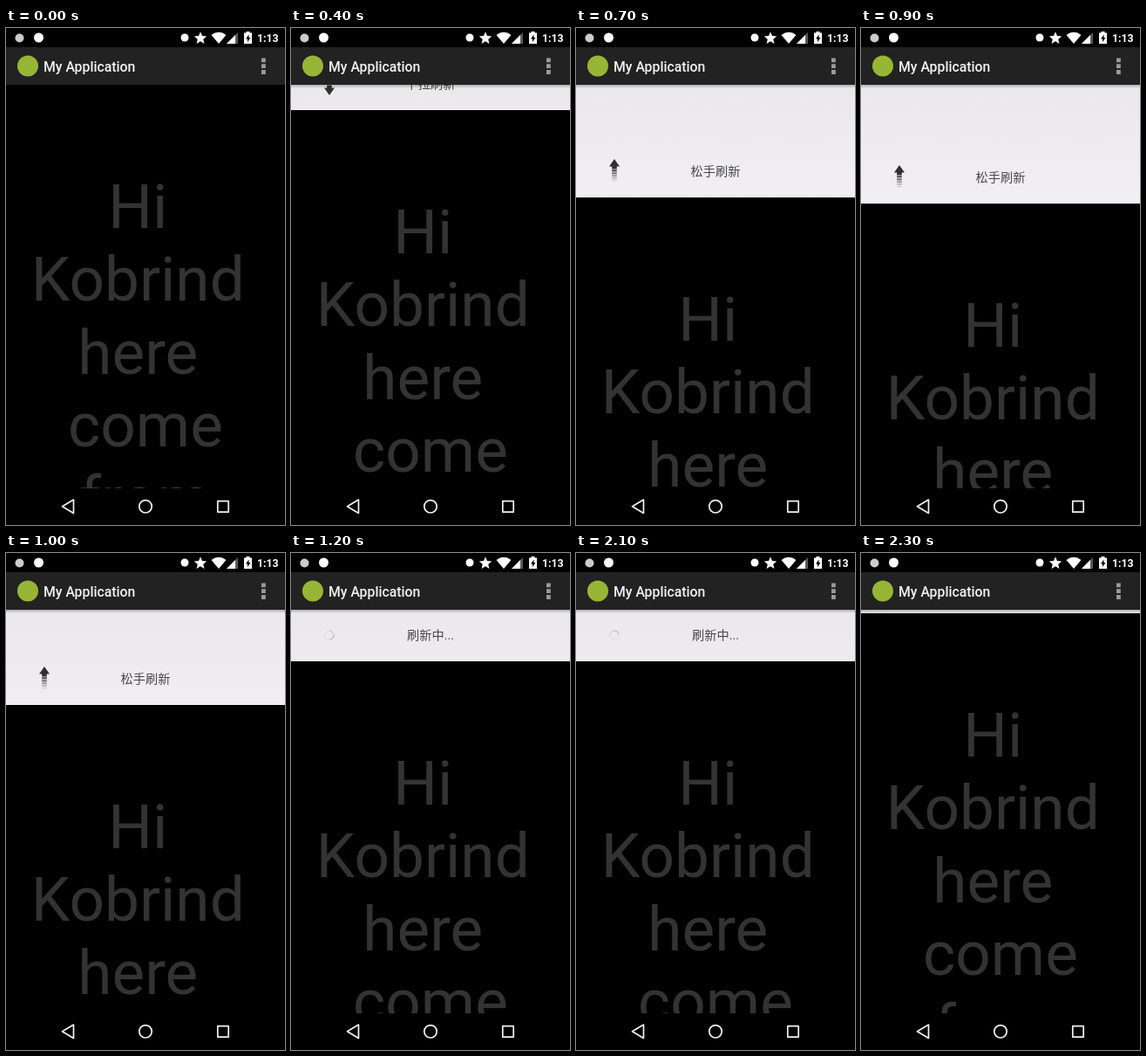
Recreate the animation shown at these times as an HTML page. Size 320x569 px, loop 2400 ms.

```html
<!DOCTYPE html>
<html lang="en">
<head>
<meta charset="utf-8">
<title>Pull to refresh</title>
<style>
  html, body { margin: 0; width: 100%; height: 100%; overflow: hidden; background: #000; }
  svg { display: block; width: 100%; height: 100%; font-family: Roboto, "Noto Sans CJK SC", sans-serif; }
  .big { font-size: 71.1px; fill: #333; text-anchor: middle; }
  .label { font-size: 14.2px; fill: #48484a; text-anchor: middle; }

  .sheet, .pull, .release, .busy { animation: 2400ms step-end infinite; }
  .sheet { animation-name: drag; }
  .pull { animation-name: pull; }
  .release { animation-name: release; }
  .busy { animation-name: busy; }
  .spin { transform-origin: 44px 35px; animation: spin 1200ms steps(12) infinite; }

  @keyframes drag {
    0% { transform: translateY(0); }
    16.66% { transform: translateY(29px); }
    20.83% { transform: translateY(60px); }
    25% { transform: translateY(97px); }
    29.16% { transform: translateY(129px); }
    33.33% { transform: translateY(138px); }
    37.5% { transform: translateY(136px); }
    41.66% { transform: translateY(109px); }
    45.83% { transform: translateY(64px); }
    50% { transform: translateY(59px); }
    91.66% { transform: translateY(26px); }
    95.83% { transform: translateY(4px); }
    100% { transform: translateY(0); }
  }
  @keyframes pull { 0% { opacity: 1; } 25%, 100% { opacity: 0; } }
  @keyframes release { 0% { opacity: 0; } 25% { opacity: 1; } 50%, 100% { opacity: 0; } }
  @keyframes busy { 0% { opacity: 0; } 50%, 100% { opacity: 1; } }
  @keyframes spin { to { transform: rotate(360deg); } }
</style>
</head>
<body>
<svg viewBox="0 0 320 569">
  <defs>
    <linearGradient id="backdrop" x2="0" y2="1">
      <stop stop-color="#eae8eb"/><stop offset="1" stop-color="#f2f0f3"/>
    </linearGradient>
    <linearGradient id="shade" x2="0" y2="1">
      <stop stop-opacity=".25"/><stop offset="1" stop-opacity="0"/>
    </linearGradient>
    <g id="arrow" fill="#303032">
      <path d="M44 21l6 8.5h-3.2v3h-5.6v-3H38z"/>
      <path d="M41.2 33.2h5.6v2.2h-5.6z" opacity=".85"/>
      <path d="M41.2 36.3h5.6v2.1h-5.6z" opacity=".68"/>
      <path d="M41.2 39.3h5.6v1.9h-5.6z" opacity=".48"/>
      <path d="M41.2 42.1h5.6v1.7h-5.6z" opacity=".3"/>
      <path d="M41.2 44.8h5.6v1.5h-5.6z" opacity=".15"/>
    </g>
  </defs>

  <rect y="64" width="320" height="150" fill="url(#backdrop)"/>

  <g class="sheet">
    <g class="pull">
      <use href="#arrow" transform="rotate(180 44 34.5)"/>
      <text class="label" x="160" y="40.3">下拉刷新</text>
    </g>
    <g class="release">
      <use href="#arrow"/>
      <text class="label" x="160" y="40.3">松手刷新</text>
    </g>
    <g class="busy">
      <g class="spin" fill="none" stroke="#77757a">
        <circle cx="44" cy="35" r="5" opacity=".13"/>
        <path d="M44 30a5 5 0 0 1 5 5" opacity=".22"/>
        <path d="M49 35a5 5 0 0 1-4 4.9" opacity=".42"/>
      </g>
      <text class="label" x="160" y="40.3">刷新中...</text>
    </g>
    <rect y="65" width="320" height="520"/>
    <g class="big">
      <text x="151.3" y="229">Hi</text>
      <text x="151.3" y="312.4">Kobrind</text>
      <text x="151.3" y="395.8">here</text>
      <text x="160" y="479.2">come</text>
      <text x="160" y="562.6">from</text>
    </g>
  </g>

  <rect y="65" width="320" height="4" fill="url(#shade)"/>

  <!-- Action bar -->
  <rect width="320" height="22"/>
  <rect y="22" width="320" height="43" fill="#222"/>
  <circle cx="25" cy="43.5" r="12" fill="#98b636"/>
  <text x="43" y="49.7" font-size="15.8" font-weight="500" fill="#f3f3f3">My Application</text>
  <path d="M293 34.5h4.8v4.8H293zm0 6.8h4.8v4.8H293zm0 6.8h4.8v4.8H293z" fill="#9b9b9b"/>

  <!-- Status bar -->
  <g fill="#fff">
    <circle cx="15.5" cy="11.5" r="5" fill="#ccc"/>
    <circle cx="37.5" cy="11" r="5.5"/>
    <circle cx="205" cy="11" r="4.5"/>
    <path d="M223 4.3l2 4.8 5.2.4-4 3.4 1.3 5.1-4.5-2.8-4.5 2.8 1.3-5.1-4-3.4 5.2-.4z"/>
    <path d="M235.5 8Q244 1.5 252.5 8L244 18z"/>
    <path d="M266 5v13h-13z" opacity=".35"/>
    <path d="M263 8v10h-10z"/>
    <path d="M275.5 4h4v1.5h2.5V18h-9V5.5h2.5z"/>
    <path d="M278.5 7.5l-3.500 5h2v3.500l3.500-5h-2z" fill="#000"/>
    <text x="288" y="15.8" font-size="12.3" font-weight="700">1:13</text>
  </g>

  <!-- Navigation bar -->
  <rect y="527" width="320" height="42"/>
  <g fill="none" stroke="#f2f2f2" stroke-width="1.7" stroke-linejoin="round">
    <path d="M64.5 547.8l13-7.7v15.4z"/>
    <circle cx="160" cy="547.8" r="7.2"/>
    <path d="M242.8 541.7h12.4v12.4h-12.4z"/>
  </g>
</svg>
</body>
</html>
```
